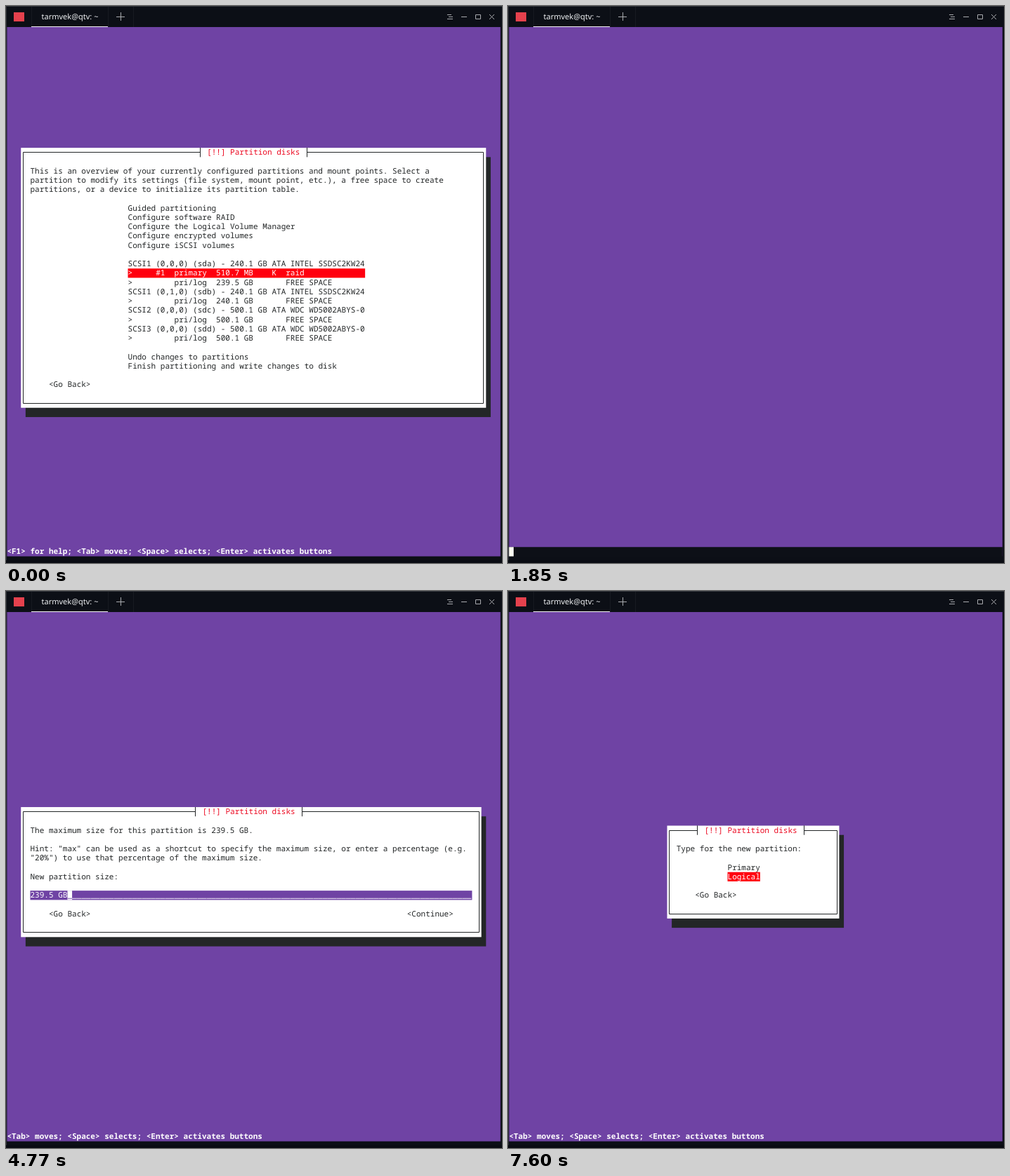
These frames come from a looping animation (706 by 794 pixels, 8000 ms). An HTML page:

```html
<!DOCTYPE html>
<html lang="en">
<head>
<meta charset="utf-8">
<title>Partition disks</title>
<style>
  html, body { margin: 0; width: 100%; height: 100%; overflow: hidden; background: #0c0f16; }
  svg { display: block; width: 706px; height: 794px; }
  text { white-space: pre; text-rendering: geometricPrecision; }
  #term { font: 11.033px "Noto Sans Mono", "DejaVu Sans Mono", monospace; }
  .tab { font: 11px "Noto Sans", "Open Sans", sans-serif; fill: #eef0f2; }
  .icons { fill: none; stroke: #a9abaf; }

  .anim { animation: 8s step-end infinite; }
  #overview { animation-name: overview; }
  #first { animation-name: first; }
  #second { animation-name: second; }
  #blank { animation-name: blank; }
  #usage { animation-name: usage; }
  #size { animation-name: size; }
  #caret { animation-name: caret; }
  #go { animation-name: go; }
  #kind { animation-name: kind; }

  @keyframes overview { 0% { opacity: 1 } 23.125%, 100% { opacity: 0 } }
  @keyframes first { 0% { opacity: 1 } 6.25%, 100% { opacity: 0 } }
  @keyframes second { 0% { opacity: 0 } 6.25%, 100% { opacity: 1 } }
  @keyframes blank { 0% { opacity: 0 } 23.125% { opacity: 1 } 23.75%, 100% { opacity: 0 } }
  @keyframes usage { 0% { opacity: 0 } 23.75% { opacity: 1 } 45.125%, 100% { opacity: 0 } }
  @keyframes size { 0% { opacity: 0 } 45.125% { opacity: 1 } 95%, 100% { opacity: 0 } }
  @keyframes caret {
    0%, 59.625%, 73.375% { opacity: 1 }
    52.125%, 67.125%, 73.875%, 100% { opacity: 0 }
  }
  @keyframes go { 0% { opacity: 0 } 73.875%, 100% { opacity: 1 } }
  @keyframes kind { 0% { opacity: 0 } 95%, 100% { opacity: 1 } }
</style>
</head>
<body>
<svg viewBox="0 0 706 794">
  <rect width="706" height="794" fill="#0c0f16"/>
  <rect width="706" height="1" fill="#34373c"/>
  <rect width="1" height="794" fill="#2a2d33"/>
  <rect y="790" width="706" height="4" fill="#090b12"/>
  <path d="M36.5 1V30M145.5 1V30M181.5 1V30" stroke="#171a21"/>
  <rect x="36" y="29" width="109" height="2" fill="#f4f4f4"/>
  <rect x="11" y="9" width="15" height="13" fill="#e5414d"/>
  <text class="tab" x="50.5" y="19">tarmvek@qtv: ~</text>
  <g class="icons">
    <path d="M157 15.5H169M163.5 9V21"/>
    <path d="M628 12.5H634M630 15.5H636M628 18.5H636"/>
    <path d="M648 15.5H656M668.5 12.5H675.5V18.5H668.5Z"/>
    <path d="M688 12L695 19M695 12L688 19"/>
  </g>
  <rect x="1.4" y="30" width="702.4" height="754.5" fill="#6f43a4"/>
  <g id="term"></g>
</svg>
<script>
  const CELL_W = 6.62, CELL_H = 13.235, LEFT = 1.4, TOP = 30.1;
  const INK = '#232627', RED = '#ff000f', PURPLE = '#6f43a4', WHITE = '#fff';
  const px = col => LEFT + col * CELL_W;
  const py = row => TOP + row * CELL_H;
  const mid = v => Math.floor(v) + 0.5;
  const escapeText = s => s.replace(/&/g, '&amp;').replace(/</g, '&lt;');

  const fill = (col, row, w, h, color) =>
    `<rect x="${px(col)}" y="${py(row)}" width="${w * CELL_W}" height="${h * CELL_H}" fill="${color}"/>`;

  const put = (col, row, str, color = INK, attrs = '') =>
    `<text x="${px(col)}" y="${py(row) + 10.2}" fill="${color}" ${attrs}>${escapeText(str)}</text>`;

  const lines = (col, row, list) => list.map((s, i) => s && put(col, row + i, s)).join('');

  const marked = (col, row, str, w = str.length) =>
    fill(col, row, w, 1, RED) + put(col, row, str, WHITE);

  const group = (id, body) => `<g id="${id}" class="anim">${body}</g>`;

  function dialog(col, row, w, h) {
    const x1 = mid(px(col + 0.5)), x2 = mid(px(col + w - 0.5));
    const y1 = mid(py(row + 0.5)), y2 = mid(py(row + h - 0.5));
    const t = col + Math.floor((w - 24) / 2);
    const t1 = mid(px(t + 0.5)), t2 = mid(px(t + 23.5));
    const tick = `V${py(row)}V${py(row + 1)}`;
    return fill(col + 1, row + 1, w, h, INK) + fill(col, row, w, h, WHITE) +
      `<path fill="none" stroke="${INK}" d="M${t1} ${y1}H${x1}V${y2}H${x2}V${y1}H${t2}${tick}M${t1} ${y1}${tick}"/>` +
      put(t + 2, row, '[!!] Partition disks', '#ec0a22');
  }

  const keys = '<Tab> moves; <Space> selects; <Enter> activates buttons';
  const status = str => put(0, 56, str, WHITE, 'font-weight="bold"');
  const longHelp = status('<F1> for help; ' + keys);
  const shortHelp = status(keys);

  const free = size => `>         pri/log  ${size} GB       FREE SPACE`;
  const disk = (bus, unit, name, size, model) =>
    `SCSI${bus} (0,${unit},0) (${name}) - ${size} GB ATA ${model}`;
  const raid = '>     #1  primary  510.7 MB    K  raid';

  const overview = dialog(3, 13, 100, 28) +
    lines(5, 15, [
      'This is an overview of your currently configured partitions and mount points. Select a',
      'partition to modify its settings (file system, mount point, etc.), a free space to create',
      'partitions, or a device to initialize its partition table.'
    ]) +
    lines(26, 19, [
      'Guided partitioning',
      'Configure software RAID',
      'Configure the Logical Volume Manager',
      'Configure encrypted volumes',
      'Configure iSCSI volumes',
      '',
      disk(1, 0, 'sda', '240.1', 'INTEL SSDSC2KW24'),
      raid,
      free('239.5'),
      disk(1, 1, 'sdb', '240.1', 'INTEL SSDSC2KW24'),
      free('240.1'),
      disk(2, 0, 'sdc', '500.1', 'WDC WD5002ABYS-0'),
      free('500.1'),
      disk(3, 0, 'sdd', '500.1', 'WDC WD5002ABYS-0'),
      free('500.1'),
      '',
      'Undo changes to partitions',
      'Finish partitioning and write changes to disk'
    ]) +
    put(9, 38, '<Go Back>') +
    group('first', marked(26, 26, raid, 51)) +
    group('second', marked(26, 27, free('239.5'), 51)) +
    longHelp;

  const blank = `<rect x="1.4" y="${py(56)}" width="702.4" height="${CELL_H + 1}" fill="#0d1017"/>` +
    fill(0, 56, 1, 1, '#fffff2');

  const usage = dialog(29, 23, 48, 11) +
    put(31, 25, 'How to use this free space:') +
    marked(32, 27, 'Create a new partition', 38) +
    lines(32, 28, [
      'Automatically partition the free space',
      'Show Cylinder/Head/Sector information'
    ]) +
    put(35, 31, '<Go Back>') +
    longHelp;

  const size = dialog(3, 21, 99, 14) +
    lines(5, 23, [
      'The maximum size for this partition is 239.5 GB.',
      '',
      'Hint: "max" can be used as a shortcut to specify the maximum size, or enter a percentage (e.g.',
      '"20%") to use that percentage of the maximum size.',
      '',
      'New partition size:'
    ]) +
    fill(5, 30, 95, 1, PURPLE) +
    put(5, 30, '239.5 GB'.padEnd(95, '_'), WHITE) +
    group('caret', fill(13, 30, 1, 1, WHITE) + put(13, 30, '_', PURPLE)) +
    put(9, 32, '<Go Back>') +
    put(86, 32, '<Continue>') +
    group('go', marked(86, 32, '<Continue>')) +
    shortHelp;

  const kind = dialog(34, 23, 37, 10) +
    put(36, 25, 'Type for the new partition:') +
    put(47, 27, 'Primary') +
    marked(47, 28, 'Logical') +
    put(40, 30, '<Go Back>') +
    shortHelp;

  document.getElementById('term').innerHTML =
    Object.entries({ overview, blank, usage, size, kind })
      .map(([id, body]) => group(id, body)).join('');
</script>
</body>
</html>
```
